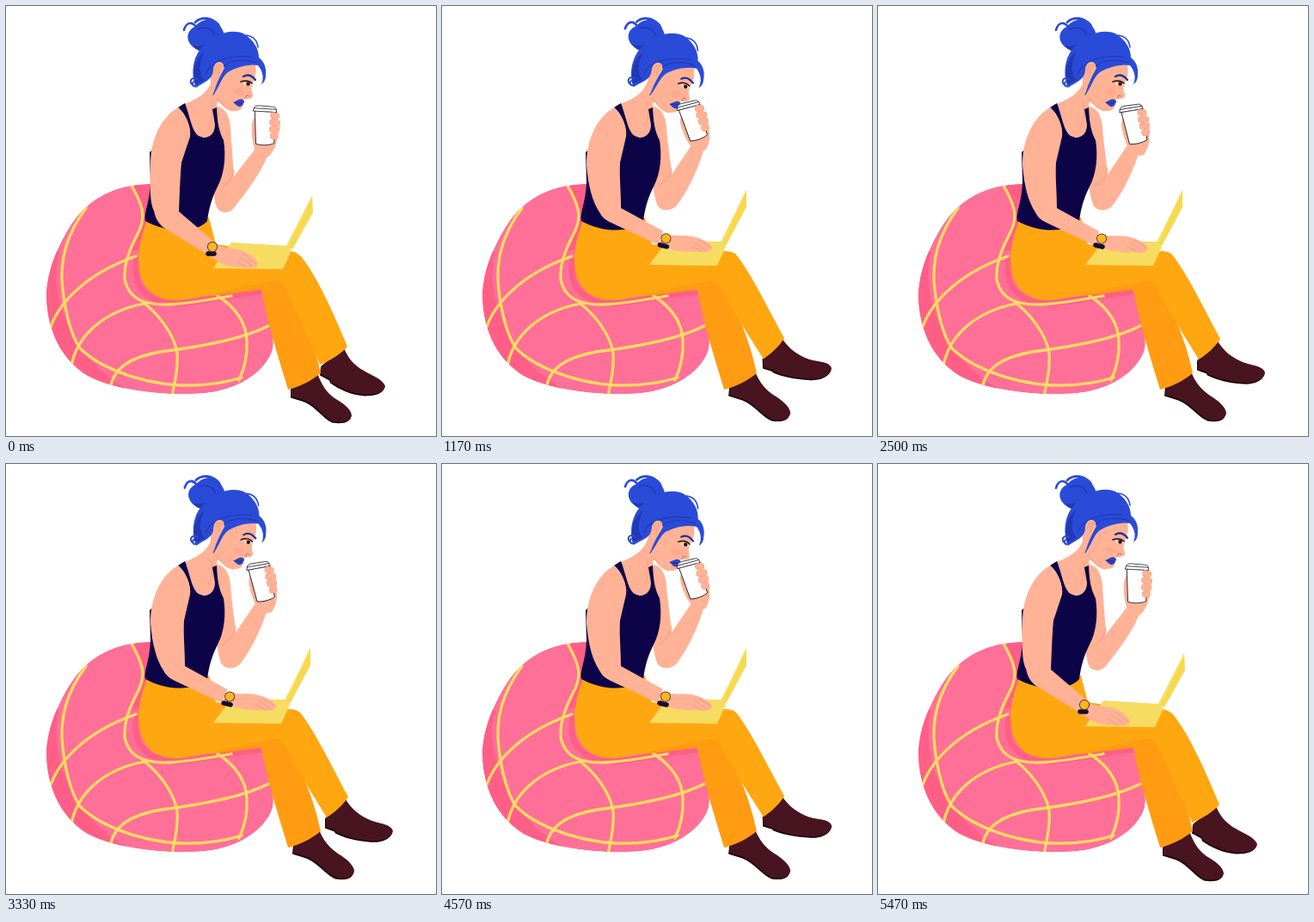
An HTML page with a canvas for the animation above (6000 ms loop, 500x500 px).

```html
<!DOCTYPE html>
<html lang="en">
<head>
<meta charset="utf-8">
<title>Coffee on the bean bag</title>
<style>
html, body { margin: 0; width: 100%; height: 100%; overflow: hidden; background: #fff; }
canvas { display: block; width: 100vw; height: 100vh; object-fit: contain; }
</style>
</head>
<body>
<canvas id="stage"></canvas>
<script>
const canvas = document.getElementById('stage');
const ctx = canvas.getContext('2d');
const scale = window.devicePixelRatio || 1;
canvas.width = canvas.height = 500 * scale;

const SKIN = '#ffb295', SHADE = '#f0937a', NAVY = '#0d0447', HAIR = '#2a4bd8', DARK_HAIR = '#2139b4';
const PANTS = '#ffa711', PANTS_SHADE = '#ff9c12', SHOE = '#48141f';
const PINK = '#ff7098', DEEP_PINK = '#ff5f86', STRIPE = '#ffdb62', INK = '#20202a';

function fill(d, color) {
  ctx.fillStyle = color;
  ctx.fill(new Path2D(d));
}
function line(d, color, width) {
  ctx.strokeStyle = color;
  ctx.lineWidth = width;
  ctx.stroke(new Path2D(d));
}
function dot(x, y, r, color) {
  ctx.fillStyle = color;
  ctx.beginPath();
  ctx.arc(x, y, r, 0, 7);
  ctx.fill();
}
// Blends two paths that share the same commands.
function mix(a, b, p) {
  const to = b.match(/-?[\d.]+/g);
  let i = 0;
  return a.replace(/-?[\d.]+/g, n => (+n + (to[i++] - n) * p).toFixed(2));
}
// Smooth curve through [step, value] keys.
function curve(keys, k) {
  const last = keys.length - 1;
  if (k <= keys[0][0]) return keys[0][1];
  if (k >= keys[last][0]) return keys[last][1];
  let i = 0;
  while (keys[i + 1][0] < k) i++;
  const slope = j => j <= 0 || j >= last ? 0
    : (keys[j + 1][1] - keys[j - 1][1]) / (keys[j + 1][0] - keys[j - 1][0]);
  const [x0, y0] = keys[i], [x1, y1] = keys[i + 1], w = x1 - x0, u = (k - x0) / w;
  const u2 = u * u, u3 = u2 * u;
  return y0 * (2 * u3 - 3 * u2 + 1) + y1 * (3 * u2 - 2 * u3)
    + w * (slope(i) * (u3 - 2 * u2 + u) + slope(i + 1) * (u3 - u2));
}

const STEP = 100 / 3, END = 71;
const move = {
  head: [[0, 0], [15, .065], [26, .066], [38, .06], [48, .044], [49, .041], [71, 0]],
  cupX: [[0, 301], [15, 292.5], [26, 292], [38, 292], [48, 293.8], [49, 294.4], [71, 298]],
  cupY: [[0, 139], [15, 134], [26, 133.5], [38, 133.5], [48, 134], [49, 134.3], [71, 137.5]],
  cupTurn: [[0, .02], [15, -.3], [26, -.3], [38, -.3], [48, -.27], [49, -.26], [71, -.2]],
  work: [[0, 0], [15, .68], [26, 1], [71, 1]],
  foot: [[0, 0], [15, 1.2], [26, 1.35], [36, 1.25], [48, 1], [71, 1]],
  eye: [[0, 1], [6, 1], [11, .2], [15, .6], [20, 1], [44, 1], [48, .45], [49, 0], [52, 0], [57, 1], [71, 1]]
};

function stepAt(t) {
  if (t < 170) return 0;
  if (t < 3100) return Math.min(END, 1 + Math.floor((t - 170) / STEP + .3));
  return Math.max(0, END - 1 - Math.floor((t - 3100) / STEP + .3));
}

function drawBag() {
  const bag = 'M172 207C130 206 100 222 80 248C60 276 47 310 47 338C48 380 66 412 95 430C130 449 200 455 240 449C270 444 297 428 308 405C316 390 306 360 296 328L240 325L160 300Z';
  ctx.save();
  ctx.clip(new Path2D(bag));
  fill(bag, PINK);
  fill('M62 285C48 335 76 415 150 450L90 465L30 400L40 290Z', DEEP_PINK);
  fill('M149 209C160 235 164 250 146 285L180 280L185 205Z', DEEP_PINK);
  line('M152 295C146 328 166 345 200 346C235 343 262 335 300 332', DEEP_PINK, 7);
  const seams = [
    'M93 235C69 267 62 300 66 330C70 362 77 385 86 398C106 418 150 438 202 441C230 442 255 438 274 432',
    'M50 379C58 350 88 313 151 291',
    'M76 419C82 384 113 355 161 346',
    'M121 446C124 421 145 408 180 402C220 397 272 389 305 372',
    'M146 209C158 230 163 243 155 261C141 288 137 302 138 318C143 342 163 348 190 347C212 346 235 342 262 337',
    'M160 345C184 364 202 393 199 414C199 430 195 440 193 455',
    'M246 337C268 351 280 370 280 390C281 408 277 422 271 435'
  ];
  for (const s of seams) line(s, STRIPE, 3.3);
  ctx.restore();
}

function drawFarArm(work) {
  fill(mix(
    'M244 117C251 117 259 122 261 140C262 160 264 180 265 198L290 166L305 171C297 195 278 218 264 236C258 242 248 241 245 234C240 220 240 200 240 180Z',
    'M244 117C251 117 259 122 261 140C262 160 266 180 267 196L290 162L304 168C298 190 284 218 272 233C265 239 254 239 250 231C246 220 244 200 240 180Z',
    work), SKIN);
  line(mix('M265 190C264 200 258 206 251 212', 'M267 188C266 198 260 204 252 210', work), SHADE, .8);
}

function drawShoe(d) {
  ctx.save();
  ctx.translate(-1, 1.5);
  fill(d, '#160008');
  ctx.restore();
  fill(d, SHOE);
}

function drawLegs(foot) {
  drawShoe(mix(
    'M367 418L393 398C398 410 405 418 416 424C426 430 438 434 441 442C440 449 430 452 418 452C402 451 388 444 378 437L377 434L366 428Z',
    'M372 411L394 388C402 402 412 409 424 414C434 418 447 418 450 426C450 434 438 439 425 438C408 437 394 433 384 428L383 426L372 422Z',
    foot));
  drawShoe(mix(
    'M332 444L362 427C367 440 372 449 382 456C392 462 401 468 402 476C401 483 392 485 380 483C368 477 362 465 348 459L332 454Z',
    'M335 442L364 425C369 438 376 446 386 453C396 459 404 466 405 473C404 481 396 483 384 481C371 475 365 463 350 457L334 452Z',
    Math.min(foot, 1.05)));
  fill('M230 338L297 330C304 370 318 412 328 446C341 443 355 436 366 427C360 400 352 372 322 312L270 310Z', PANTS_SHADE);
  const rear = 'M164 250C154 275 152 295 156 312C162 335 180 343 202 342C235 338 262 328 300 322C312 318 318 319 322 323';
  const hip = 'C336 284 326 284 318 288L244 277L236 246C210 240 180 245 164 250Z';
  fill(mix(
    rear + 'C336 352 352 385 365 417C378 412 390 404 397 396C380 355 362 315 343 291' + hip,
    rear + 'C335 350 354 380 373 411C382 405 391 398 398 387C378 350 360 312 342 289' + hip,
    Math.min(foot, 1.1)), PANTS);
}

function drawTorso() {
  fill('M241 80C238 98 226 108 204 115L214 152L246 152L247 119C243 113 246 108 256 114L250 80Z', SKIN);
  line('M238 112C241 120 240 132 236 140', SHADE, .7);
  fill('M200 118L208 113C214 128 216 146 224 151C234 156 243 150 243 138L240 120L245 118C246 138 248 146 253 156C256 175 254 195 246 210C240 222 236 234 234 250C225 262 190 266 162 250C160 240 167 230 168 205L167 170L190 150L214 150C214 135 208 125 200 118Z', NAVY);
}

function drawHead(angle, eye) {
  ctx.save();
  ctx.translate(235, 118);
  ctx.rotate(angle);
  ctx.translate(-235, -118);

  fill('M238 72C238 82 236 94 243 106C250 115 256 121 265 122C272 122 274 120 275 117L277 113L275 110L279 108C284 108 288 107 287 103C285 98 285 93 288 88C291 80 292 72 288 62Z', SKIN);
  line('M244 106C250 114 256 121 264 122', SHADE, .8);
  fill('M264 98C270 95 276 98 277 102C272 105 266 103 264 98Z', '#fda78b');
  line('M279 107C278 104 281 103 283 105', '#b85b51', .9);

  // Eye and brow
  ctx.save();
  ctx.translate(0, 1);
  if (eye < .15) {
    line('M274 89C277 93 282 95 286 92', '#1c1020', 1.6);
  } else {
    fill('M276 89L283 86.5L286 90C283 92.5 279 92.5 276 89Z', '#fff2ea');
    dot(281.5, 89.5, 2.4, '#5a2714');
    dot(282, 89.5, 1.4, '#120a10');
    const lid = mix('M274 89C277 92 282 94 286 91', 'M273 87C276 86 282 85 286 89', eye);
    fill('M273 84L286 84L286 87' + lid.replace('M', 'L') + 'L273 84Z', SKIN);
    line(lid, '#1c1020', 1.5);
  }
  line('M276 81C281 78 286 80 290 85', '#20309a', 2.2);
  ctx.restore();
  fill('M264 112C268 111 271 107.5 274 108.5C277.5 109.5 278 112 275.5 113C276 115.5 273.5 117 271 117C268 116.5 267 114 264 112Z', '#2b43c5');
  line('M267 112.5L275 113', '#162788', .7);

  // Hair
  fill('M218 48C208 40 210 28 220 24C228 13 245 13 250 25C258 36 252 46 240 51C232 55 224 53 218 48Z', HAIR);
  fill('M217 46C228 48 241 43 247 32C252 42 246 48 240 51C232 55 223 53 217 46Z', DARK_HAIR);
  line('M221 24C215 17 209 20 207 28', HAIR, 2.6);
  line('M220 19C227 12 239 13 247 22', HAIR, 2.8);
  fill('M221 95C214 78 218 58 228 48C242 32 262 26 276 32C288 39 294 50 294 60C300 64 303 72 302 80C302 86 300 89 297 91C300 84 299 76 293 69C282 67 268 71 258 77C252 82 248 90 241 103C245 88 250 80 254 72C250 62 243 64 241 75C240 86 231 88 221 95Z', HAIR);
  fill('M220 91C216 76 220 62 230 54C224 68 224 78 231 86C227 88 224 90 220 91Z', DARK_HAIR);
  line('M222 85C216 82 213 87 216 91M218 88C215 92 219 95 222 92', HAIR, 2);
  line('M279 34C288 35 292 40 293 48', HAIR, 1.6);
  line('M223 27C231 23 240 26 243 34', DARK_HAIR, 1.4);
  line('M232 80C237 64 259 57 285 59M252 71C262 61 280 62 292 66', DARK_HAIR, 1.2);

  // Ear
  fill('M242 80C239 72 243 64 249 65C255 66 254 74 250 79C248 84 245 86 242 80Z', SKIN);
  line('M244 76C243 69 247 67 251 69M247 79C246 76 249 74 248 71', SHADE, .9);
  line('M257 74C251 82 248 92 241 103', HAIR, 1.3);
  ctx.restore();
}

function drawLaptop(work) {
  fill(mix('M262 275L328 279L332 284L322 306L241 305Z', 'M262 273L325 274L330 280L320 302L241 301Z', work), '#f6dc61');
  fill(mix('M356 220L357 240L333 283L326 279Z', 'M354 214L354 234L330 279L324 275Z', work), '#f7d94f');
  line(mix('M356 222L328 279', 'M353 216L326 275', work), '#fbe47a', 1);
}

function drawNearArm(work) {
  const top = 'M200 118C180 130 168 155 168 185', back = 'L214 152C216 140 208 126 200 118Z';
  fill(mix(
    top + 'C167 215 168 230 172 238C174 248 178 254 184 258L234 289L242 274L201 239C202 220 202 205 204 182' + back,
    top + 'C170 210 175 228 183 240C186 246 190 249 196 252L251 278L257 262L208 235C208 215 206 200 207 182' + back,
    work), SKIN);
  fill(mix(
    'M234 289L242 276C252 283 266 281 274 284C284 288 292 294 293 300C290 305 282 305 276 304C264 304 250 301 243 295Z',
    'M251 278L258 265C270 269 280 266 290 268C300 270 312 275 314 282C313 287 306 288 300 286C288 287 276 286 266 283Z',
    work), SKIN);
  line(mix('M272 292L286 302M268 296L279 304M276 288L291 300', 'M294 275L307 285M290 280L302 286M298 272L312 281', work), SHADE, .8);
  line(mix('M235 288L242 288', 'M253 278L261 280', work), '#170b35', 5.5);
  const x = 240 + 20 * work, y = 280 - 9.5 * work;
  dot(x, y, 6, '#3a2130');
  dot(x, y, 5.2, '#fdb51c');
}

function drawCup(x, y, turn) {
  ctx.save();
  ctx.translate(x, y);
  ctx.rotate(turn);
  fill('M-12 -9C-17 -4 -15 12 -13 22C-11 28 -10 32 -11 37L4 37C9 32 15 24 15 10L10 -10Z', SKIN);
  const body = 'M-12 -17L-10 21.5C-4 23.5 6 23 11 20.5L12.5 -16Z';
  fill(body, '#fff');
  line(body, INK, .9);
  const lid = 'M-14 -17L-13 -20C-12 -22.5 -10 -23 -7 -23L8 -22C12 -22 13 -20 13.5 -16Z';
  fill(lid, '#fff');
  line(lid + 'M-13 -20L13 -19', INK, .8);
  for (const f of ['M10 -12L13 -11', 'M9 -4L14 -3', 'M9 4L13.5 4', 'M10 12L12 12']) {
    line(f, SHADE, 7.8);
    line(f, SKIN, 7);
  }
  fill('M12 -12L16.5 -4L16 9L13 17L11.5 14Z', SKIN);
  ctx.restore();
}

function draw(t) {
  const k = stepAt(t), at = name => curve(move[name], k);
  ctx.setTransform(scale, 0, 0, scale, 0, 0);
  ctx.fillStyle = '#fff';
  ctx.fillRect(0, 0, 500, 500);
  ctx.lineCap = ctx.lineJoin = 'round';
  const work = at('work');
  drawBag();
  drawFarArm(work);
  drawLegs(at('foot'));
  drawTorso();
  drawHead(at('head'), at('eye'));
  drawLaptop(work);
  drawNearArm(work);
  drawCup(at('cupX'), at('cupY'), at('cupTurn'));
}

const start = performance.now();
function tick() {
  draw((performance.now() - start) % 6000);
  requestAnimationFrame(tick);
}
tick();
</script>
</body>
</html>
```
